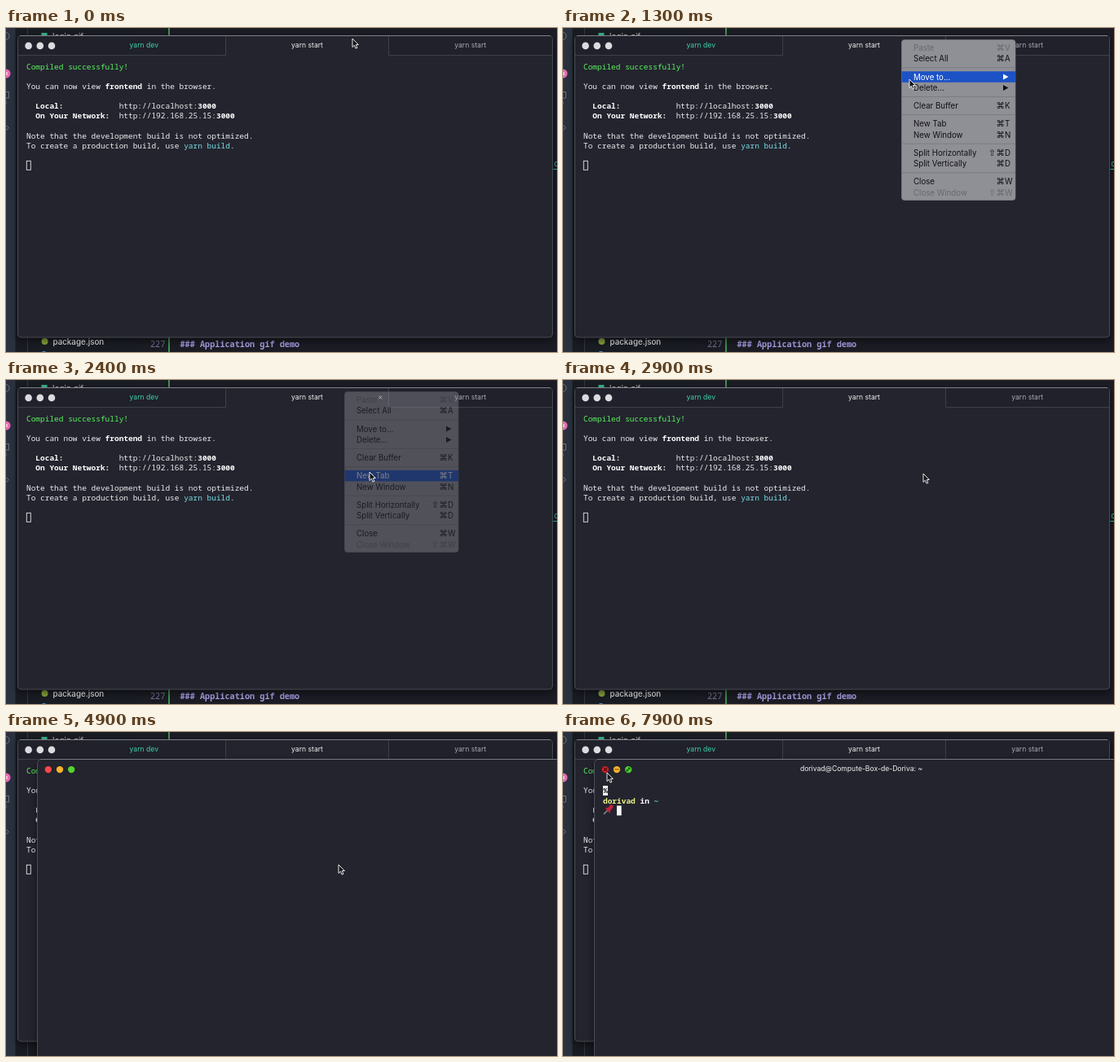
Write an HTML page that moves like this. It is 676x398 px and loops after 8000 ms.

```html
<!DOCTYPE html>
<html lang="en">
<head>
<meta charset="utf-8">
<title>Terminal windows</title>
<style>
  html, body { margin: 0; width: 100%; height: 100%; overflow: hidden; background: #1b1c24; }
  svg { display: block; width: 676px; height: 398px; }
  text { white-space: pre; }
  .mono { font: 9.48px "Noto Sans Mono", monospace; fill: #ececee; }
  .b { font-weight: 700; fill: #fff; }
  .ui { font: 8.6px Inter, sans-serif; fill: #f2f2f2; text-anchor: middle; }
  .menu { font: 9.7px Inter, sans-serif; }
  .sym { font: 10.5px "DejaVu Sans", sans-serif; }
  .win { filter: drop-shadow(0 4px 5px rgba(0, 0, 0, .5)); }
</style>
</head>
<body>
<svg viewBox="0 0 676 398">
  <!-- editor behind the windows -->
  <rect width="676" height="398" fill="#1b1c24"/>
  <rect width="160" height="398" fill="#191c23"/>
  <rect width="11.5" height="398" fill="#29323e"/>
  <path d="M26.5 0V398" stroke="#34363d"/>
  <path d="M200 0V398" stroke="#3f9150" stroke-width="2"/>
  <g fill="none" stroke="#667588">
    <path d="M0 5.500a4 4.500 0 0 1 0 9M0 78.500H3.500V86H0M0 90v4M0 119.500L3.500 122.500L0 125.500"/>
  </g>
  <circle cy="56" r="5.500" fill="#e86bb5"/>
  <path d="M1 54v4" stroke="#fff"/>
  <rect x="43.500" y="6" width="7" height="7" fill="#35b58f"/>
  <text x="57" y="14" font-family="Inter, sans-serif" font-size="10" fill="#c9cbd0">login.gif</text>
  <circle cx="47.500" cy="385" r="4" fill="#8aa63d"/>
  <path d="M44.500 397.500h4" stroke="#4a86b8"/>
  <text x="57.500" y="388.800" font-family="Inter, sans-serif" font-size="9.800" font-weight="500" fill="#e6e7ea">package.json</text>
  <text x="177" y="391.500" font-family="Noto Sans Mono, monospace" font-size="10.200" fill="#717796">227</text>
  <text x="213.500" y="391.500" font-family="Noto Sans Mono, monospace" font-size="10.200" font-weight="700" fill="#aa9fe6">### Application gif demo</text>
  <text x="672" y="170" font-family="Noto Sans Mono, monospace" font-size="10" fill="#35b5a0">c</text>
  <path d="M671 173.500h5" stroke="#35b5a0"/>

  <!-- first window -->
  <g class="win">
    <rect x="14.500" y="9.500" width="656" height="370.500" rx="4" fill="#23242e" stroke="#484a54"/>
  </g>
  <path d="M17 9.500H668" stroke="#82838a"/>
  <path d="M15 33V13.500q0-3.500 3.500-3.500H269V33ZM470 33V10H666.500q3.500 0 3.500 3.500V33Z" fill="#20212b"/>
  <path d="M15 33.500H269.500V10M670 33.500H469.500V10" fill="none" stroke="#3d3f49"/>
  <g id="grey" fill="#dcdce0"></g>
  <text class="ui" x="169.300" y="24.300" style="fill:#3fd0a7">yarn dev</text>
  <text class="ui" x="369.500" y="24.300">yarn start</text>
  <text class="ui" x="569.700" y="24.300" style="fill:#a9aab0">yarn start</text>
  <path id="tabX" d="M457.300 19.300l4 4m0-4l-4 4" stroke="#d8d8dc" stroke-width=".9"/>
  <g class="mono" id="log"></g>
  <rect x="25.300" y="163.300" width="5" height="11" fill="none" stroke="#e4e4e6" stroke-width=".9"/>

  <!-- second window -->
  <g id="win2">
    <g class="win"><rect x="38.500" y="33.500" width="660" height="400" rx="5" fill="#23242e" stroke="#4c4e58"/></g>
    <path d="M42 33.500H676" stroke="#777982"/>
    <g id="lights"></g>
    <g id="glyphs" fill="none" stroke-width="1.100">
      <path d="M50 44l4 4m0-4l-4 4" stroke="#5c0509"/>
      <path d="M63.300 46h5.400" stroke="#875100"/>
      <path d="M78.200 47.800l3.600-3.600M78 45.700V48h2.300M79.700 44H82V46.300" stroke="#0b5e08"/>
    </g>
    <g id="prompt">
      <text class="ui" x="366" y="48.300">dorivad@Compute-Box-de-Doriva: ~</text>
      <rect x="49" y="66" width="6" height="12" fill="#f4f4f4"/>
      <text class="mono" x="49.200" y="75.300" style="fill:#23242e;font-weight:700">%</text>
      <text class="mono b" x="49" y="87.500"><tspan fill="#eff58b">dorivad</tspan> in <tspan fill="#7edfe8">~</tspan></text>
      <path d="M50 101L55 96" stroke="#8d8f96" stroke-width="1.500"/>
      <path d="M51.500 93.500L54.500 93L57 91.500V90L61.500 89.500L61 94L59.500 94.500L58 97L57.500 100Z" fill="#c3223c"/>
      <rect x="66" y="90.500" width="5.700" height="12" fill="#f6f6f6"/>
    </g>
  </g>

  <!-- context menu -->
  <g id="menu" class="menu">
    <rect x="415.500" y="14.500" width="139.500" height="197" rx="3.500" fill="#8f8f96" stroke="#85858c" stroke-width=".6"/>
    <rect id="bar" x="415.500" width="139.500" height="13.500" fill="#1c52c6"/>
  </g>

  <path id="pointer" d="M0 0V10.500L2.400 8.200L4.100 12.100L5.900 11.300L4.300 7.500H7.400Z" fill="#14141a" stroke="#fff" stroke-width=".9" stroke-linejoin="round"/>
</svg>
<script>
const NS = "http://www.w3.org/2000/svg";
const $ = id => document.getElementById(id);
const LOOP = 8000, STEP = 100;

function add(parent, tag, attrs, text) {
  const el = document.createElementNS(NS, tag);
  for (const k in attrs) el.setAttribute(k, attrs[k]);
  if (text) el.textContent = text;
  parent.appendChild(el);
  return el;
}
const show = (id, on) => $(id).setAttribute("visibility", on ? "visible" : "hidden");

// Terminal output: line number, then runs of [text, colour or "b"]
const log = [
  [0, ["Compiled successfully!", "#5bf35d"]],
  [2, ["You can now view "], ["frontend", "b"], [" in the browser."]],
  [4, ["  Local:            ", "b"], ["http://localhost:"], ["3000", "b"]],
  [5, ["  On Your Network:  ", "b"], ["http://192.168.25.15:"], ["3000", "b"]],
  [7, ["Note that the development build is not optimized."]],
  [8, ["To create a production build, use "], ["yarn build", "#78dfe6"], ["."]]
];
for (const [n, ...runs] of log) {
  const line = add($("log"), "text", { x: 25, y: 51.2 + n * 12.05 });
  for (const [text, look] of runs)
    add(line, "tspan", look === "b" ? { class: "b" } : look ? { fill: look } : {}, text);
}

for (const i of [0, 1, 2]) add($("grey"), "circle", { cx: 27.6 + i * 14.2, cy: 21.9, r: 4.3 });
const lights = ["#fa4549", "#f7b32b", "#52d42c"].map((fill, i) =>
  add($("lights"), "circle", { cx: 51.8 + i * 14.2, cy: 46.1, r: 4.2, fill }));

// Menu rows: centre, label, shortcut (">" opens a submenu), disabled
const rows = [
  [24.3, "Paste", "⌘V", true], [37.8, "Select All", "⌘A"],
  [60, "Move to...", ">"], [73.5, "Delete...", ">"],
  [95.6, "Clear Buffer", "⌘K"],
  [117.7, "New Tab", "⌘T"], [131.2, "New Window", "⌘N"],
  [153.3, "Split Horizontally", "⇧⌘D"], [166.8, "Split Vertically", "⌘D"],
  [188.7, "Close", "⌘W"], [202.2, "Close Window", "⇧⌘W", true]
].map(([y, label, keys, off]) => {
  const g = add($("menu"), "g", {});
  const base = y + 3.5;
  add(g, "text", { x: 430, y: base }, label);
  if (keys === ">") add(g, "path", { d: `M540 ${y - 3.4}l6.500 3.400l-6.500 3.400z` });
  else {
    if (keys[0] === "⇧") add(g, "text", { x: 522, y: base, class: "sym" }, "⇧");
    add(g, "text", { x: 531.5, y: base, class: "sym" }, "⌘");
    add(g, "text", { x: 542, y: base }, keys.slice(-1));
  }
  return { y, g, off };
});
for (const y of [48.8, 84.5, 106.6, 142.2, 177.8])
  add($("menu"), "path", { d: `M415.500 ${y}h139.500`, stroke: "#7b7b82" });

// Pointer stops: time, x, y
const stops = [
  [0, 425, 13], [900, 425, 13], [1300, 425, 63], [1700, 427, 66],
  [2300, 446, 113], [2700, 446, 113], [2900, 442, 115], [4100, 442, 115],
  [4400, 399, 192], [4600, 399, 192], [4900, 408, 163], [5000, 406, 156],
  [5500, 406, 156], [6200, 88, 55], [6300, 84, 57], [6500, 70, 61],
  [6700, 54, 50], [LOOP, 54, 50]
];
function pointerAt(t) {
  const i = stops.findIndex(s => s[0] > t);
  const [t0, x0, y0] = stops[i - 1], [t1, x1, y1] = stops[i];
  const p = (t - t0) / (t1 - t0), e = p * p * (3 - 2 * p);
  return [x0 + (x1 - x0) * e, y0 + (y1 - y0) * e];
}

function draw(time) {
  const t = Math.floor((time % LOOP) / STEP) * STEP;
  const [x, y] = pointerAt(t);
  $("pointer").setAttribute("transform", `translate(${x} ${y})`);
  show("tabX", t >= 300 && t < 2800);

  show("menu", t >= 900 && t < 2500);
  $("menu").setAttribute("opacity", t < 2400 ? 1 : 0.42);
  const hit = rows.find(r => !r.off && Math.abs(r.y - y) <= 6.75);
  $("bar").setAttribute("y", hit ? hit.y - 6.75 : 0);
  $("bar").setAttribute("opacity", hit ? 1 : 0);
  for (const r of rows) r.g.setAttribute("fill", r === hit ? "#fff" : r.off ? "#68686f" : "#101014");

  const opacity = Math.max(0, Math.min(1, (t - 4600) / 200));
  $("win2").setAttribute("opacity", opacity);
  $("prompt").setAttribute("opacity", t >= 5500 ? 1 : 0);
  $("glyphs").setAttribute("opacity", t >= 6400 ? 1 : 0);
  lights[0].setAttribute("fill", t >= 7900 ? "#c9242c" : "#fa4549");
}

function tick() {
  draw(performance.now());
  requestAnimationFrame(tick);
}
tick();
</script>
</body>
</html>
```
